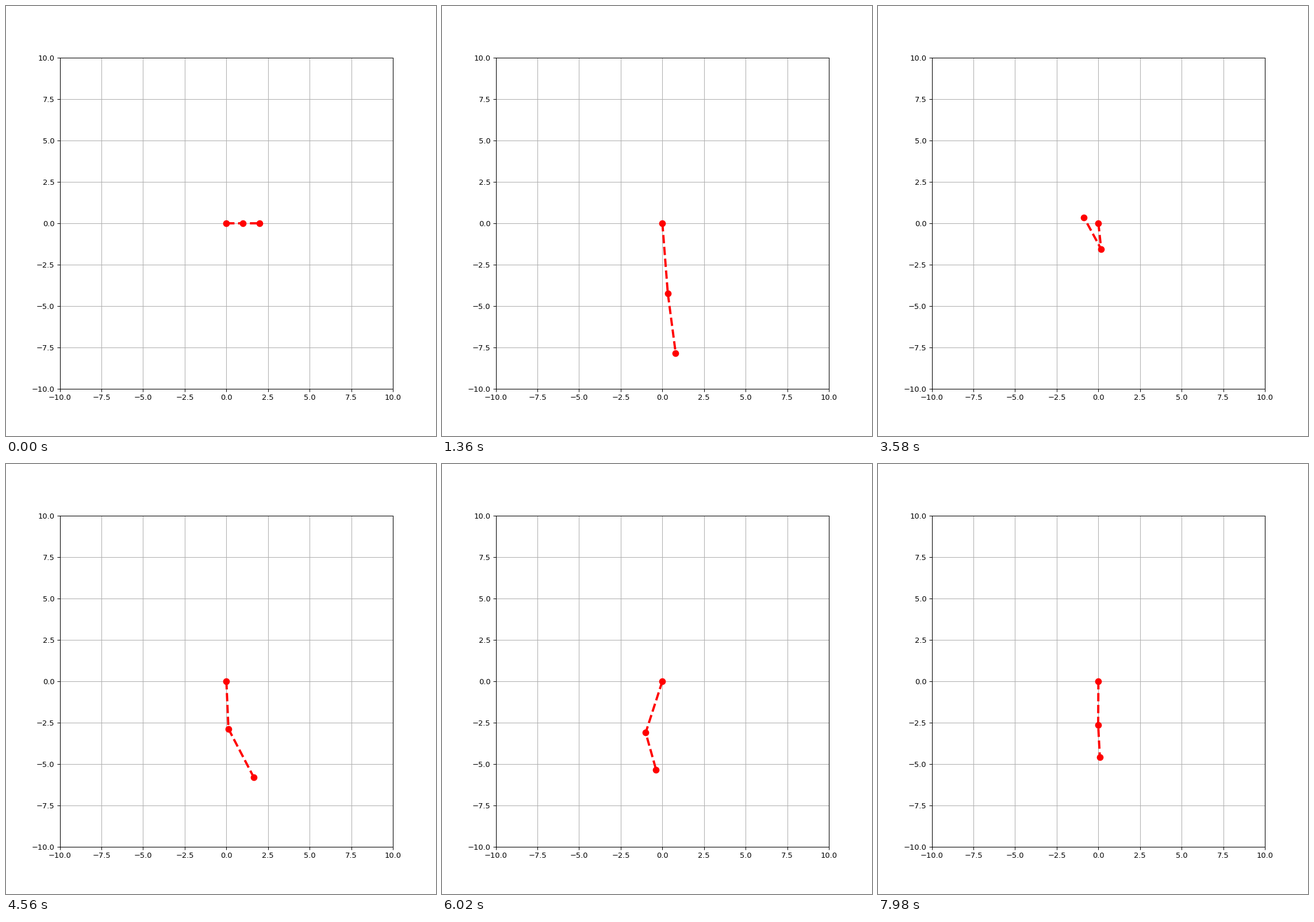
Recreate the animation shown at these times as a matplotlib script. Size 748x748 px, loop 8 s.

```python
import numpy as np
import matplotlib.pyplot as plt
from matplotlib.animation import FuncAnimation

# Two equal masses hanging in a chain on two identical springs
G, K, REST, MASS = 9.81, 10.0, 1.0, 1.0
FRAMES, INTERVAL = 400, 20
DT = 20 / 999
SUBSTEPS = 20


def pull(d):
    """Force of a spring stretched along d, acting on its far end."""
    return -K * (1 - REST / np.hypot(*d)) * d


def rate(s):
    """Time derivative of the state (p1, p2, v1, v2)."""
    p1, p2, v1, v2 = s
    f1, f2 = pull(p1), pull(p2 - p1)
    weight = np.array([0, -G])
    return np.array([v1, v2, weight + (f1 - f2) / MASS, weight + f2 / MASS])


def rk4(s, h):
    a = rate(s)
    b = rate(s + h / 2 * a)
    c = rate(s + h / 2 * b)
    d = rate(s + h * c)
    return s + h / 6 * (a + 2 * b + 2 * c + d)


def simulate():
    s = np.array([[1.0, 0], [2, 0], [0, 0], [0, 0]])
    path = []
    for _ in range(FRAMES):
        path.append(np.vstack([[0, 0], s[:2]]))
        for _ in range(SUBSTEPS):
            s = rk4(s, DT / SUBSTEPS)
    return path


path = simulate()

fig, ax = plt.subplots(figsize=(8, 8), dpi=93.5)
ax.grid()
ax.set_xlim(-10, 10)
ax.set_ylim(-10, 10)
chain, = ax.plot([], [], 'ro--', lw=3, markersize=8)


def animate(i):
    chain.set_data(*path[i].T)
    return chain,


ani = FuncAnimation(fig, animate, frames=FRAMES, interval=INTERVAL,
                    repeat=True, repeat_delay=0, blit=True)
plt.show()
```
